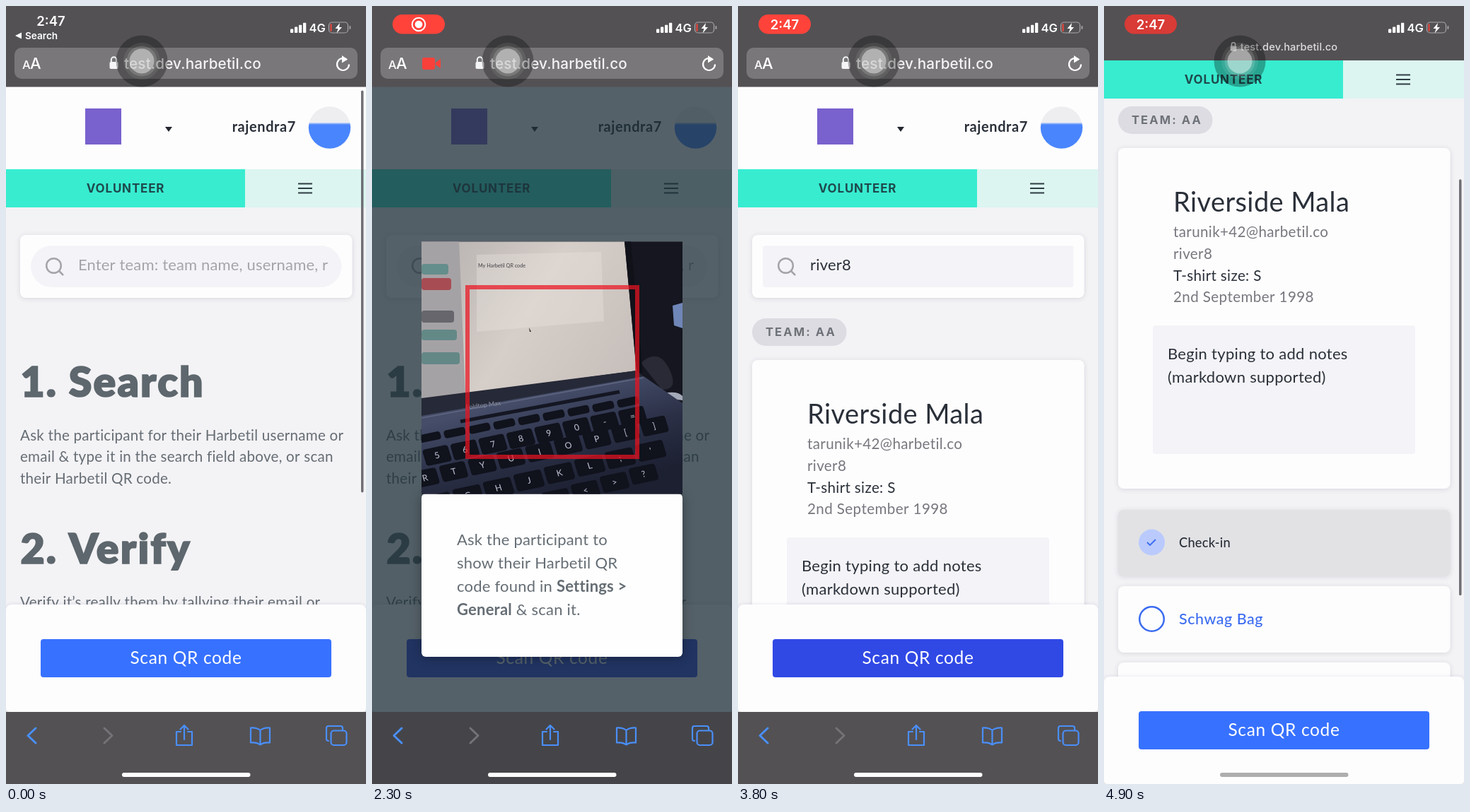
An HTML page with a canvas that plays this animation: 509x1101 px, repeating every 5000 ms.

```html
<!DOCTYPE html>
<html lang="en">
<head>
<meta charset="utf-8">
<title>Volunteer check-in</title>
<style>
  html, body { margin: 0; width: 100%; height: 100%; overflow: hidden; background: #535154; }
  canvas { display: block; }
</style>
</head>
<body>
<canvas id="stage" width="509" height="1101"></canvas>
<script>
const W = 509, H = 1101, LOOP = 5000, STEP = 100;
const ctx = document.getElementById('stage').getContext('2d');
const BAR = '#535154', WHITE = '#fefdfe', PAGE = '#f3f2f5', FIELD = '#f4f3f7';
const INK = '#2a3039', GREY = '#656d74', SLATE = '#5d676d', BLUE = '#4a8ffa';
const USER = 'river8', SITE = 'test.dev.harbetil.co';

const clamp = (v, a = 0, b = 1) => Math.min(b, Math.max(a, v));
const mix = (a, b, k) => a + (b - a) * k;

function text(str, x, y, size, color, { w = 400, ls = 0, align = 'left', font = 'Lato', fat = 0 } = {}) {
  ctx.font = `${w} ${size}px ${font}, sans-serif`;
  ctx.letterSpacing = ls + 'px';
  ctx.textAlign = align;
  ctx.fillStyle = ctx.strokeStyle = color;
  ctx.fillText(str, x, y);
  if (fat) {
    ctx.lineWidth = fat;
    ctx.strokeText(str, x, y);
  }
  return ctx.measureText(str).width;
}
const lines = (list, x, y, gap, size, color, opt) =>
  list.forEach((s, i) => text(s, x, y + i * gap, size, color, opt));

function box(x, y, w, h, color, r = 0) {
  ctx.fillStyle = color;
  ctx.beginPath();
  ctx.roundRect(x, y, w, h, r);
  ctx.fill();
}
function shadowed(blur, color, draw) {
  ctx.save();
  ctx.shadowBlur = blur;
  ctx.shadowColor = color;
  ctx.shadowOffsetY = 1;
  draw();
  ctx.restore();
}
const card = (y, h, color = WHITE) =>
  shadowed(7, 'rgba(60,60,90,.16)', () => box(20, y, 469.5, h, color, 8));

function disc(x, y, r, color) {
  ctx.fillStyle = color;
  ctx.beginPath();
  ctx.arc(x, y, r, 0, 7);
  ctx.fill();
}
function ring(x, y, r, color, lw) {
  ctx.strokeStyle = color;
  ctx.lineWidth = lw;
  ctx.beginPath();
  ctx.arc(x, y, r, 0, 7);
  ctx.stroke();
}
function path(d, color, lw) {
  const p = new Path2D(d);
  if (lw) {
    ctx.strokeStyle = color;
    ctx.lineWidth = lw;
    ctx.stroke(p);
  } else {
    ctx.fillStyle = color;
    ctx.fill(p);
  }
}
function fade(x0, y0, x1, y1, ...colors) {
  const g = ctx.createLinearGradient(x0, y0, x1, y1);
  colors.forEach((c, i) => g.addColorStop(i / (colors.length - 1), c));
  return g;
}

/* ---- page ---- */
function header() {
  box(0, 114, W, 117, WHITE);
  box(112, 145, 51, 51, '#7961ce');
  path('M225 171h10l-5 7z', '#22262e');
  text('rajendra7', 410, 178, 20, INK, { w: 700, ls: 0.6, align: 'right' });
  disc(457.5, 172, 29.7, fade(0, 164.5, 0, 168, '#eeeef1', '#4985fd'));
}

function nav(y) {
  box(0, y, W, 54, '#dcf5f0');
  box(0, y, 338, 54, '#38ecd0');
  text('VOLUNTEER', 169, y + 33.3, 17, '#1e4a4c', { w: 700, ls: 0.8, align: 'center', font: 'Inter' });
  for (const dy of [19.5, 26, 32.5]) box(413, y + dy, 20, 2, '#2d3b42');
}

function searchCard(value, round) {
  card(324, 89);
  box(35, 339, 439.5, 59, FIELD, round);
  ring(67.5, 367.5, 10.3, '#a5a4aa', 2.5);
  path('M75 375l6 6', '#a5a4aa', 2.5);
  if (value) return text(value, 102, 374, 22, INK, { ls: 0.2 });
  ctx.save();
  ctx.beginPath();
  ctx.rect(100, 339, 357, 59);
  ctx.clip();
  text('Enter team: team name, username, r', 102, 374, 22, '#a5a4aa', { ls: 0.16 });
  ctx.restore();
}

function guide() {
  const head = { w: 900, ls: 2.1, fat: 1.6 }, body = { ls: 0.24 };
  text('1. Search', 20.5, 552.5, 59, SLATE, head);
  lines(['Ask the participant for their Harbetil username or',
    'email & type it in the search field above, or scan',
    'their Harbetil QR code.'], 20, 614.5, 30.7, 20.6, GREY, body);
  text('2. Verify', 20.5, 788.5, 59, SLATE, head);
  text('Verify it’s really them by tallying their email or', 20, 850.5, 20.6, GREY, body);
}

function stats() {
  text('Live Stats', 20, 466, 25, '#a8a7ae', { ls: 0.3 });
  [['EXPECTED', 28, 'CHECKED-IN', 24], ['FOOD COUPONS', 14, 'SCHWAG BAG', 15]].forEach((row, i) => {
    const y = 522 + i * 109;
    for (const c of [0, 1]) {
      const x = c ? 231.5 : 20;
      text(row[c * 2], x, y, 17, '#686e75', { w: 700, ls: 2.6, font: 'Inter' });
      text(String(row[c * 2 + 1]), x + 0.5, y + 56.5, 49, '#262e38', { w: 900, ls: 0.8, fat: 1.2 });
    }
    box(210.5, y - 19, 1.5, 94, '#b9b9be');
  });
}

function result() {
  box(20, 442, 133.5, 39, '#dddce2', 19.5);
  text('TEAM: AA', 39, 467, 16.5, '#6e7279', { w: 700, ls: 2.1, font: 'Inter' });
  card(501, 482);
  text('Riverside Mala', 98, 590.5, 38, INK, { ls: 0.4 });
  lines(['tarunik+42@harbetil.co', USER], 98, 627, 30.7, 20.6, '#76787e', { ls: 0.35 });
  text('T-shirt size: S', 98, 688.5, 20.6, INK, { ls: 0.35 });
  text('2nd September 1998', 98, 719, 20.6, '#76787e', { ls: 0.4 });
  box(69, 752, 371, 182, FIELD, 4);
  lines(['Begin typing to add notes', '(markdown supported)'], 90, 800, 33, 22, INK, { ls: 0.3 });

  card(1013, 94, '#e2e2e5');
  disc(67.5, 1059, 18.5, '#bacafc');
  path('M61 1059l4 4 8-8', '#3b6cf0', 1.8);
  text('Check-in', 106, 1066, 18.3, INK, { w: 500, ls: 0.2 });
  card(1121, 94);
  ring(67.5, 1167.5, 17.3, '#3b6cf0', 2.5);
  text('Schwag Bag', 106, 1174.5, 21.5, '#3b6cf0', { w: 500, ls: 0.5 });
  card(1229, 94);
}

function sheet(dy, color, focus) {
  shadowed(6, 'rgba(60,60,90,.18)', () => box(0, 847 + dy, W, 152, WHITE, [8, 8, 5, 5]));
  if (focus) box(47.5, 894.5 + dy, 414, 57, '#d5dafa', 5);
  box(49, 896 + dy, 411, 54, color, 4);
  if (focus) {
    ctx.strokeStyle = '#8796f0';
    ctx.lineWidth = 2;
    ctx.strokeRect(50.5, 897.5 + dy, 408, 51);
  }
  text('Scan QR code', 254.5, 931 + dy, 24.5, '#fff', { ls: 0.65, align: 'center' });
}

/* ---- scanner ---- */
function keyRow(x, y, dx, dy, labels, w = 36, h = 23) {
  [...labels].forEach((ch, i) => {
    ctx.save();
    ctx.transform(1, -0.21, 0.3, 1, x + i * dx, y + i * dy);
    box(-w / 2, -h / 2, w, h, '#10121c', 4);
    text(ch, 0, 4, 12, '#b4b8c8', { align: 'center', w: 500 });
    ctx.restore();
  });
}

function photo() {
  ctx.save();
  ctx.beginPath();
  ctx.rect(70, 333.5, 369, 357);
  ctx.clip();
  box(70, 333, 369, 358, '#15161f');
  path('M380 505q25-22 40 8t-10 30z', '#292a35');
  path('M425 424l14-4v36l-12-4z', '#6f86b8');
  path('M412 548q20-4 27 4v6q-12-2-22 0z', '#a4a9b8');

  path('M70 333H357L374 516 70 557z', fade(70, 333, 376, 520, '#b3aeae', '#d6cec8', '#c6beba'));
  path('M357 333h9l17 187-9-3z', '#101119');
  path('M70 333h53l9 216-62 8z', '#a5a2a5');
  path('M148 352l176-4 4 98-180 15z', 'rgba(236,230,224,.35)');
  const chips = [[365, 15, '#648e8b'], [385, 17, '#a84c54'], [431, 17, '#66666c'], [458, 15, '#638987'], [490, 17, '#648886']];
  chips.forEach(([y, h, c], i) => box(70, y, 38 + i * 4, h, c, 4));
  text('My Harbetil QR code', 150, 370, 7.2, '#4c4a50', { w: 500 });
  path('M222 455l3 6-2 0z', '#222');

  path('M70 555L374 516l12 10L70 585z', '#262937');
  path('M70 580L384 524l55 38v130H70z', fade(240, 550, 275, 690, '#454d69', '#2b3047', '#1c2031'));
  path('M70 583L384 526', '#5f6780', 1.5);
  path('M125 588l225-42', '#141622', 5);
  ctx.save();
  ctx.translate(133, 571);
  ctx.rotate(-0.13);
  text('Foldtop Max', 0, 0, 9, '#8c90a0');
  ctx.restore();

  keyRow(82, 610, 35, -6.2, '         ', 30, 11);
  keyRow(92, 636, 39.5, -7.9, '567890-=');
  keyRow(75, 668, 40.5, -9.2, 'RTYUIOP[]');
  keyRow(93, 703, 43, -10.5, 'FGHJKL;\'', 39, 24);
  keyRow(261, 697, 41, -11.5, 'M<>?', 37, 23);
  ctx.restore();

  ctx.strokeStyle = 'rgba(236,18,32,.72)';
  ctx.lineWidth = 6;
  ctx.strokeRect(135, 398, 240, 240);
}

function scanner(alpha) {
  ctx.save();
  ctx.globalAlpha = alpha;
  box(0, 0, W, H, 'rgba(28,46,55,.75)');
  shadowed(16, 'rgba(0,0,0,.35)', () => box(70, 690, 369, 231, '#fefefe', 6));
  photo();
  const x = 120, o = { ls: 0.22 }, b = { w: 700, ls: 0.22 };
  lines(['Ask the participant to', 'show their Harbetil QR'], x, 763, 33, 22, GREY, o);
  const lead = text('code found in ', x, 829, 22, GREY, o);
  text('Settings >', x + lead, 829, 22, GREY, b);
  const bold = text('General', x, 862, 22, GREY, b);
  text(' & scan it.', x + bold, 862, 22, GREY, o);
  ctx.restore();
}

/* ---- browser and system bars ---- */
function glowSpot(x, y, color) {
  const g = ctx.createRadialGradient(x, y, 5, x, y, 62);
  g.addColorStop(0, color);
  g.addColorStop(1, 'rgba(80,80,90,0)');
  ctx.fillStyle = g;
  ctx.fillRect(x - 62, 0, 124, Math.min(y + 62, 83));
}

function lock(x, y, k, color) {
  ctx.save();
  ctx.translate(x, y);
  ctx.scale(k, k);
  box(-6, -2, 12, 10, color, 2);
  path('M-3.7-1v-4a3.7 3.7 0 0 1 7.4 0v4', color, 2);
  ctx.restore();
}

function topBar(k, s, bottom, camera) {
  box(0, 0, W, bottom, BAR);
  if (s > 0 && s < 200) {
    glowSpot(457, 172 - s, 'rgba(50,85,190,.45)');
    glowSpot(137, 170 - s, 'rgba(90,70,160,.3)');
  }
  ctx.save();
  ctx.globalAlpha = clamp(1 - 1.4 * k);
  box(12, 59 - 18 * k, 485, 44, '#79777a', 10);
  text('A', 23, 89, 16.5, '#fff', { w: 500, font: 'Inter' });
  text('A', 34, 89, 22, '#fff', { w: 500, font: 'Inter' });
  path('M482 76a8.5 8.5 0 1 0 3 6.5', '#fff', 2.2);
  path('M475 70l8 5.5-8 5z', '#fff');
  if (camera) {
    box(71, 73, 18, 17, '#f9403a', 3);
    path('M90 80l7-5v13l-7-5z', '#f9403a');
  }
  ctx.restore();
  const y = mix(81, 58, k), tone = k > 0.3 ? '#dddcde' : '#f4f3f5';
  lock(mix(152.5, 183, k), y, mix(1, 0.72, k), tone);
  text(SITE, mix(264, 261.5, k), y + mix(7.5, 5.2, k), mix(20.7, 14.6, k), tone,
    { w: 500, ls: 0.15, align: 'center', font: 'Inter' });
}

function status(t) {
  const sys = align => ({ w: 600, align, font: 'Inter' });
  if (t < 300) {
    text('2:47', 63.5, 28, 18.5, '#fff', sys('center'));
    path('M13 42l9-4.5v9z', '#fff');
    text('Search', 27, 47, 13.6, '#fff', sys('left'));
  } else {
    const dim = Math.max(0, -Math.cos((t - 3900) / 2000 * 2 * Math.PI)) ** 2;
    box(29, 12, 74, 27.5, `rgb(${255 - 38 * dim},${67 - 8 * dim},${58 - 4 * dim})`, 13.75);
    if (t < 3300) {
      ring(66, 26, 9.3, '#fff', 2);
      disc(66, 26, 5.3, '#fff');
    } else {
      text('2:47', 66, 32.5, 18.5, '#fff', sys('center'));
    }
  }
  for (let i = 0; i < 4; i++) {
    const h = 5.5 + i * 2.9;
    box(402 + i * 6, 38 - h, 4.3, h, '#fff', 1);
  }
  text('4G', 428.5, 36.5, 16.5, '#fff', sys('left'));
  ctx.strokeStyle = '#a9a7aa';
  ctx.lineWidth = 1.2;
  ctx.beginPath();
  ctx.roundRect(456.5, 23, 27, 15, 4.5);
  ctx.stroke();
  box(485.5, 28, 1.8, 5, '#a9a7aa', 1);
  box(458.5, 25, 2, 11, '#f4463c', 1);
  path('M472 24l-6.5 8h4l-2 6.5 7.5-8.5h-4z', '#fff');
}

function toolbar(dy, tint) {
  ctx.save();
  ctx.translate(0, dy);
  box(0, 999, W, 103, BAR);
  if (tint) box(0, 999, W, 103, `rgba(30,34,40,${0.25 * tint})`);
  ctx.lineJoin = ctx.lineCap = 'round';
  path('M42 1022l-11 10.5 11 10.5', BLUE, 3);
  path('M139 1022l11 10.5-11 10.5', '#757377', 3);
  path('M247 1027h-6v19h22v-19h-6M252 1038v-20m-5.5 5.5l5.5-5.5 5.5 5.5', BLUE, 2.2);
  path('M359.5 1025q-5-4-13.5-3.5v21q8.5-1 13.5 3 5-4 13.5-3v-21q-8.5-.5-13.5 3.5zv20', BLUE, 2.2);
  path('M456 1040q-3 0-3-3v-15q0-3 3-3h17q3 0 3 3v3', BLUE, 2.2);
  ctx.beginPath();
  ctx.roundRect(459.5, 1025.5, 22, 20.5, 4);
  ctx.stroke();
  ctx.restore();
}

function touchDot() {
  disc(192, 78, 36.5, 'rgba(0,0,0,.31)');
  disc(192, 78, 26, 'rgba(255,255,255,.08)');
  disc(192, 78, 21.5, 'rgba(255,255,255,.15)');
  disc(192, 78, 17.5, 'rgba(255,255,255,.42)');
}

/* ---- timeline ---- */
function draw(t) {
  const u = Math.max(0, (t - 4500) / 100);
  const scroll = 7.5 * u * u + 45 * u;
  const k = clamp(scroll / 139);
  const top = mix(114.5, 77, k), drop = 102 * k;
  const modal = t >= 2000 && t < 2700 ? 1 : t === 1900 || t === 2700 ? 0.5 : 0;
  const scanned = t >= 2700, found = t >= 3400;

  box(0, 0, W, H, PAGE);
  ctx.save();
  ctx.translate(0, -scroll);
  header();
  searchCard(scanned && USER, found ? 4 : 29.5);
  (found ? result : scanned ? stats : guide)();
  ctx.restore();
  nav(Math.max(231 - scroll, top));

  const pressed = t >= 1700 && t < 4500;
  sheet(drop, pressed ? '#3049e5' : '#3771ff', t >= 1700 && t < 1900);
  const thumb = t > 4500 ? 1 : clamp((400 - t) / 200);
  if (thumb) box(502, top + 5 + 0.544 * scroll, 3.5, 569 + 20 * k, `rgba(98,97,102,${0.9 * thumb})`, 1.75);

  if (modal) scanner(modal);
  toolbar(drop, modal);
  topBar(k, scroll, top, modal === 1);
  status(t);
  touchDot();
  const home = mix(255, 174, clamp(k * k));
  box(164, 1085, 181.5, 6, `rgb(${home},${home},${home + 1})`, 3);
}

function tick(now) {
  draw(Math.floor(now % LOOP / STEP) * STEP);
  requestAnimationFrame(tick);
}
draw(0);
requestAnimationFrame(tick);
</script>
</body>
</html>
```
